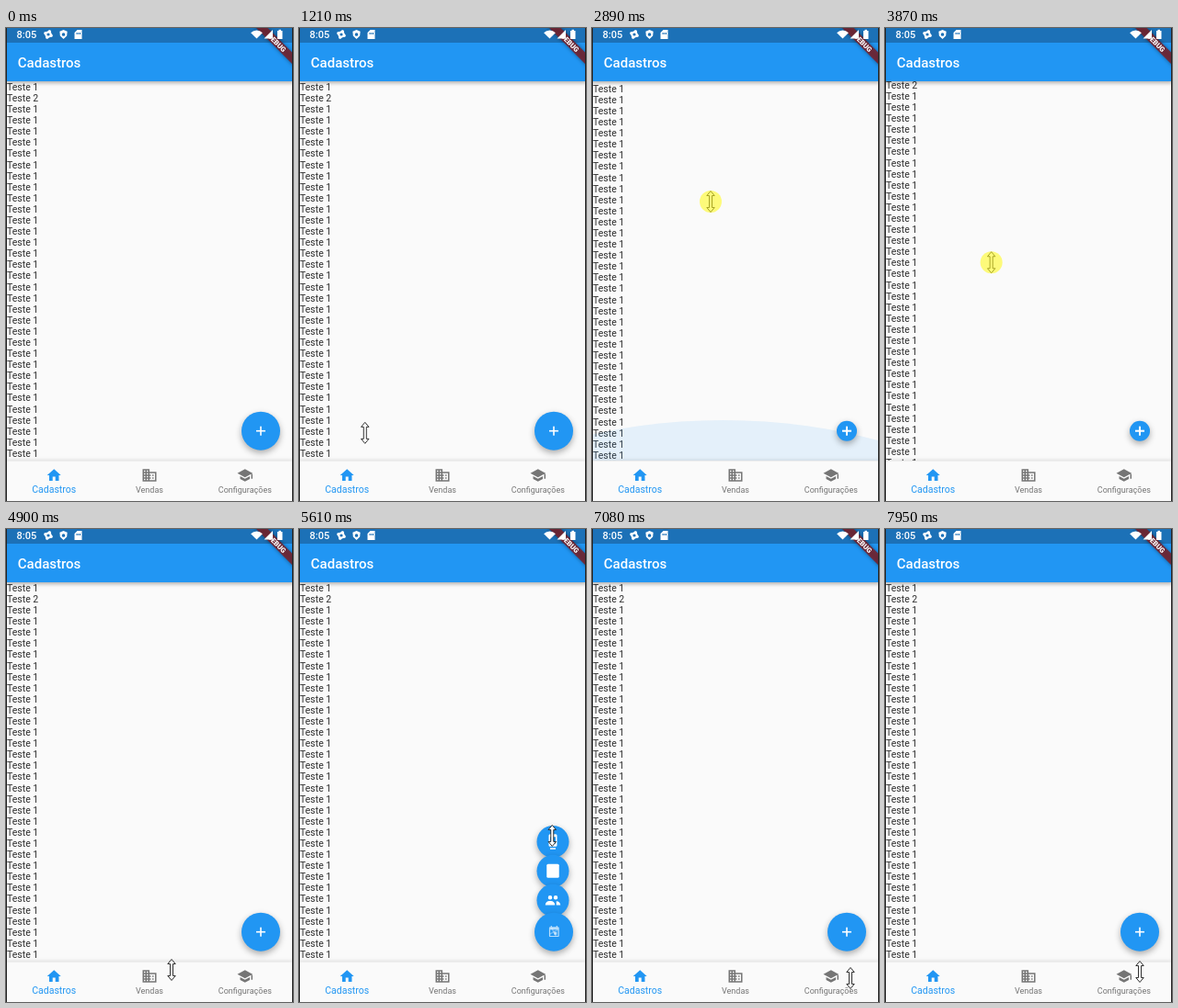
An HTML page with a canvas for the animation above (8 s loop, 312x515 px).

```html
<!DOCTYPE html>
<html lang="pt">
<head>
<meta charset="utf-8">
<style>
html, body { margin: 0; width: 100%; height: 100%; overflow: hidden; background: #fafafa; }
canvas { display: block; width: 312px; height: 515px; }
</style>
</head>
<body>
<canvas id="stage"></canvas>
<script>
const W = 312, H = 515, LOOP = 8000;
const TOP = 58, BOTTOM = 471, ROW = 12.09, ROWS = 40;
const MAX_SCROLL = ROWS * ROW - (BOTTOM - TOP);
const BLUE = '#2196f3', GREY = '#757575', PAPER = '#fafafa', WHITE = '#fff';
const FAB = { x: 277, y: 438.7 };
const canvas = document.getElementById('stage');
const ctx = canvas.getContext('2d');
const dpr = window.devicePixelRatio || 1;
canvas.width = W * dpr;
canvas.height = H * dpr;

// Pointer stops: time, x, y
const path = [
  [590, 158, 492], [900, 66, 474], [1130, 66, 474], [1500, 113, 204],
  [2040, 105, 316], [2620, 130, 142], [2890, 129, 189], [3560, 113, 285],
  [3760, 113, 285], [4110, 124, 160], [4740, 152, 492], [4900, 180, 480],
  [5120, 288, 441], [5850, 271, 298], [6310, 272, 338], [6560, 281, 438],
  [7080, 281, 489], [7950, 277, 482]
];
const presses = [[1620, 3480], [3780, 4700], [5220, 5320], [6540, 6640]];

// Eased step from 0 to 1 between two times
function ramp(t, from, to) {
  const p = Math.min(1, Math.max(0, (t - from) / (to - from)));
  return p * p * (3 - 2 * p);
}

const pulse = (t, peak) => ramp(t, peak - 300, peak) - ramp(t, peak + 50, peak + 400);
const openness = t => ramp(t, 5300, 5800) - ramp(t, 6580, 6930);
const scrollAt = t => MAX_SCROLL *
  (ramp(t, 2120, 2450) - ramp(t, 2890, 3220) + ramp(t, 3795, 4060) - ramp(t, 4220, 4400));

function pointer(t) {
  let [, x, y] = path[0];
  for (let i = 1; i < path.length; i++) {
    const [from, x0, y0] = path[i - 1], [to, x1, y1] = path[i];
    const p = ramp(t, from, to);
    x += (x1 - x0) * p;
    y += (y1 - y0) * p;
  }
  return { x, y };
}

function rect(x, y, w, h, color) {
  ctx.fillStyle = color;
  ctx.fillRect(x, y, w, h);
}

function disc(x, y, r, color) {
  ctx.beginPath();
  ctx.arc(x, y, r, 0, Math.PI * 2);
  ctx.fillStyle = color;
  ctx.fill();
}

function text(str, x, y, size, color, weight = 400, align = 'left') {
  ctx.font = `${weight} ${size}px Roboto, sans-serif`;
  ctx.textAlign = align;
  ctx.fillStyle = color;
  ctx.fillText(str, x, y);
}

function shadow(blur, dy, alpha) {
  ctx.shadowColor = `rgba(0,0,0,${alpha})`;
  ctx.shadowBlur = blur * dpr;
  ctx.shadowOffsetY = dy * dpr;
}

// Subpaths on a 24-unit icon grid; overlaps become holes
const box = (x, y, w, h, r = 0) => ctx.roundRect(x, y, w, h, r);

function dot(x, y, r) {
  ctx.moveTo(x + r, y);
  ctx.arc(x, y, r, 0, Math.PI * 2);
}

function poly(...xy) {
  ctx.moveTo(xy[0], xy[1]);
  for (let i = 2; i < xy.length; i += 2) ctx.lineTo(xy[i], xy[i + 1]);
  ctx.closePath();
}

const icons = {
  home() {
    poly(12, 3, 22, 12, 2, 12);
    box(5, 12, 5, 8);
    box(14, 12, 5, 8);
    box(10, 12, 4, 2);
  },
  building() {
    box(2, 3, 10, 18);
    box(12, 7, 10, 14);
    box(12, 9, 8, 10);
    for (let y = 5; y < 20; y += 4) {
      box(4, y, 2, 2);
      box(8, y, 2, 2);
    }
    for (const y of [11, 15]) {
      box(12, y, 2, 2);
      box(16, y, 2, 2);
    }
  },
  school() {
    poly(12, 3, 23, 9, 12, 15, 1, 9);
    box(21, 10, 2, 7);
    poly(5, 13.2, 12, 17, 19, 13.2, 19, 17.2, 12, 21, 5, 17.2);
  },
  people() {
    dot(8, 8, 3);
    dot(16, 8, 3);
    box(1, 13, 14, 6, [6, 6, 0, 0]);
    box(17, 13.2, 6, 5.8, [0, 6, 0, 0]);
  },
  dock() {
    box(6, 1, 12, 18, 2);
    box(8, 5, 8, 10);
    box(8, 21, 8, 2);
  },
  note() {
    box(3, 2, 18, 20, 2);
  },
  event() {
    box(3, 3, 18, 18, 2);
    box(5, 8, 14, 11);
    box(12, 12, 5, 5);
    box(6, 1, 2, 2);
    box(16, 1, 2, 2);
  },
  shield() {
    poly(12, 1, 21, 5, 20, 15, 12, 23, 4, 15, 3, 5);
    dot(12, 12, 4);
  },
  card() {
    poly(10, 2, 20, 2, 20, 22, 4, 22, 4, 8);
    for (const x of [8, 11.5, 15]) box(x, 8, 2, 4);
  },
  gear() {
    for (let i = 0; i < 16; i++) {
      const a = (i + .5) * Math.PI / 8, r = i % 4 < 2 ? 11 : 8;
      ctx.lineTo(12 + r * Math.cos(a), 12 + r * Math.sin(a));
    }
    ctx.closePath();
    dot(12, 12, 3.5);
  }
};

function icon(name, x, y, color, scale = .75) {
  ctx.save();
  ctx.translate(x, y);
  ctx.scale(scale, scale);
  ctx.translate(-12, -12);
  ctx.beginPath();
  icons[name]();
  ctx.fillStyle = color;
  ctx.fill('evenodd');
  ctx.restore();
}

function glow(strength, x, edge, dir) {
  if (strength <= 0) return;
  const h = W * .201, r = W * 1.5;
  ctx.save();
  ctx.translate(0, edge);
  ctx.scale(1, dir * .8 * strength ** .2);
  ctx.beginPath();
  ctx.rect(0, 0, W, h);
  ctx.clip();
  disc(W / 2 * (.5 + x / W), h - r, r, `rgba(33,150,243,${.2 * strength})`);
  ctx.restore();
}

function list(t, x) {
  const offset = scrollAt(t);
  ctx.save();
  ctx.beginPath();
  ctx.rect(0, TOP, W, BOTTOM - TOP);
  ctx.clip();
  for (let i = 0; i < ROWS; i++) {
    text(i === 1 ? 'Teste 2' : 'Teste 1', 1, TOP + 9.9 + i * ROW - offset, 10.5, 'rgba(0,0,0,.82)');
  }
  for (const peak of [2010, 3320]) glow(pulse(t, peak), x, TOP, 1);
  glow(pulse(t, 2670), x, BOTTOM, -1);
  ctx.restore();
}

function statusBar() {
  rect(0, 0, W, 16, '#1c71b7');
}

function statusIcons() {
  text('8:05', 11.5, 11, 11, WHITE, 500);
  icon('gear', 46, 7, WHITE, .46);
  icon('shield', 62.5, 7, WHITE, .46);
  icon('card', 78.5, 7, WHITE, .5);
  ctx.fillStyle = WHITE;
  ctx.beginPath();
  ctx.moveTo(272.5, 11.5);
  ctx.arc(272.5, 11.5, 9, -Math.PI * .75, -Math.PI * .25);
  ctx.fill();
  ctx.beginPath();
  poly(290, 2, 290, 11.5, 280.5, 11.5);
  ctx.fill();
  rect(295, 3, 5.5, 9, WHITE);
  rect(296.5, 1.8, 2.5, 2, WHITE);
}

function banner() {
  ctx.save();
  ctx.translate(W, 0);
  ctx.rotate(Math.PI / 4);
  ctx.save();
  shadow(4, 0, .5);
  rect(-30, 19.4, 60, 8.8, 'rgba(120,32,42,.85)');
  ctx.restore();
  text('DEBUG', -1, 26.5, 7.6, WHITE, 900, 'center');
  ctx.restore();
}

function header() {
  ctx.save();
  shadow(4, 1.5, .3);
  rect(0, 0, W, TOP, BLUE);
  ctx.restore();
  statusBar();
  text('Cadastros', 12.8, 42.6, 15, WHITE, 500);
  banner();
  statusIcons();
}

function nav() {
  ctx.save();
  shadow(5, -1, .2);
  rect(0, BOTTOM + .5, W, H - BOTTOM, PAPER);
  ctx.restore();
  const tab = (name, label, x, size, color) => {
    icon(name, x, 487, color);
    text(label, x, 506, size, color, 400, 'center');
  };
  tab('home', 'Cadastros', 52.2, 10.5, BLUE);
  tab('building', 'Vendas', 156, 9, GREY);
  tab('school', 'Configurações', 259.8, 9, GREY);
}

function button(x, y, r, color, lift = 0) {
  ctx.save();
  shadow(7 + lift, 3 + lift / 2, .32);
  disc(x, y, r, color);
  ctx.restore();
}

function plus(x, y, width, turn) {
  ctx.save();
  ctx.translate(x, y);
  ctx.rotate(turn);
  rect(-5, -width / 2, 10, width, WHITE);
  rect(-width / 2, -5, width, 10, WHITE);
  ctx.restore();
}

function actions(t, mouse) {
  const open = openness(t);
  const small = scrollAt(t) > 5;
  if (open > 0) {
    ['dock', 'note', 'people'].forEach((name, i) => {
      const x = 276, y = FAB.y + (294 + i * 47 - FAB.y) * open;
      const hover = open > .9 && Math.hypot(mouse.x - x, mouse.y - y) < 17;
      button(x, y, 17.5, hover ? '#3b9fec' : BLUE, hover ? 3 : 0);
      icon(name, x, y, WHITE);
    });
  }
  button(FAB.x, FAB.y, small ? 11 : 21, BLUE);
  ctx.globalAlpha = 1 - open;
  plus(FAB.x, FAB.y, small ? 2 : 1.6, open * Math.PI / 2);
  ctx.globalAlpha = open;
  icon('event', FAB.x + .3, FAB.y, WHITE, .6);
  ctx.globalAlpha = 1;
}

function cursor(t, { x, y }) {
  if (t < path[0][0]) return;
  ctx.save();
  ctx.translate(x, y);
  ctx.beginPath();
  poly(0, -11.5, 4.2, -6.5, 1.5, -6.5, 1.5, 6.5, 4.2, 6.5,
    0, 11.5, -4.2, 6.5, -1.5, 6.5, -1.5, -6.5, -4.2, -6.5);
  ctx.fillStyle = WHITE;
  ctx.fill();
  ctx.strokeStyle = '#1a1a1a';
  ctx.lineWidth = .9;
  ctx.stroke();
  if (presses.some(([down, up]) => t >= down && t < up)) disc(0, 0, 12, 'rgba(255,250,30,.58)');
  ctx.restore();
}

function draw(t) {
  const mouse = pointer(t);
  ctx.setTransform(dpr, 0, 0, dpr, 0, 0);
  rect(0, 0, W, H, PAPER);
  list(t, mouse.x);
  header();
  nav();
  actions(t, mouse);
  rect(0, 0, 1, H, '#222');
  rect(W - 1, 0, 1, H, '#222');
  cursor(t, mouse);
}

const start = performance.now();
function tick() {
  draw((performance.now() - start) % LOOP);
  requestAnimationFrame(tick);
}
tick();
</script>
</body>
</html>
```
